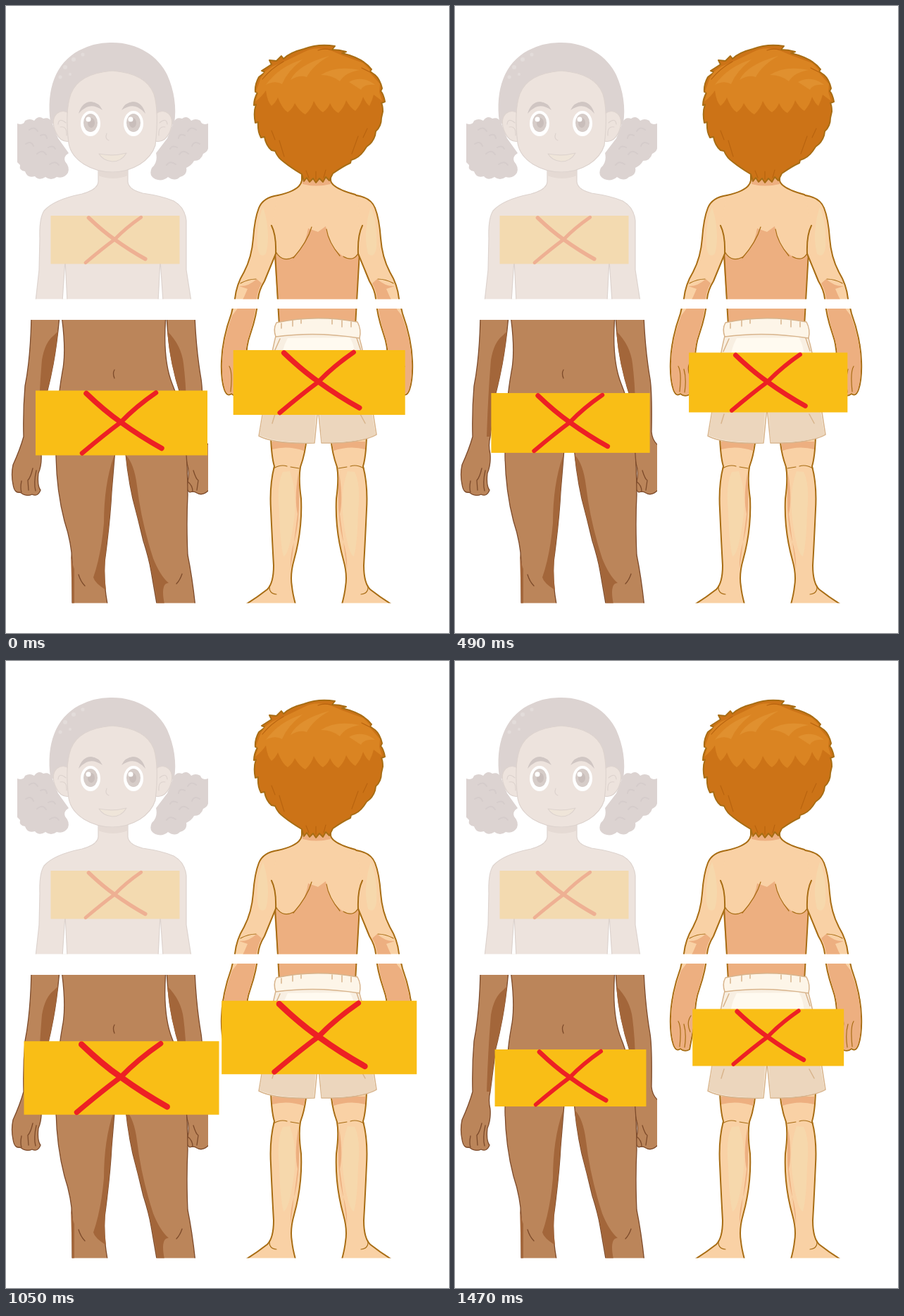
These frames come from a looping animation (629 px wide and 891 px high, 1.54 s). An HTML page:

```html
<!DOCTYPE html>
<html lang="en">
<head>
<meta charset="utf-8">
<title>Body safety chart</title>
<style>
  html, body { margin: 0; width: 100%; height: 100%; overflow: hidden; background: #fff; }
  svg { display: block; width: 629px; height: 891px; }
  path { stroke-linejoin: round; stroke-linecap: round; }
  .line { fill: none; }
  .bare { stroke: none; }
  #faded { fill: #ede3dd; stroke: #ddd3ce; stroke-width: 1.2; }
  #faded .hair { fill: #dcd3d1; stroke: none; }
  #brown { fill: #bb855a; stroke: #7d4b2b; stroke-width: 1.3; }
  #brown .shade { fill: #a3663a; stroke: none; }
  #boy { fill: #f9d1a5; stroke: #a86d14; stroke-width: 2; }
  #boy .shade { fill: #edaf80; stroke: none; }
  #boy .glow { fill: #f6d8ac; stroke: none; }
  #boy .fine { fill: none; stroke-width: 1.2; }
  #boy .cloth { stroke: #d8b48c; stroke-width: 1.5; }
</style>
</head>
<body>
<svg viewBox="0 0 629 891">
  <defs>
    <clipPath id="upper"><rect x="16" y="40" width="271" height="376.500"/></clipPath>
    <clipPath id="lower"><rect x="0" y="446" width="287" height="402.500"/></clipPath>
    <clipPath id="whole"><path d="M300 40H600V416.500H300ZM300 430H600V848.500H300Z"/></clipPath>
    <g id="cross" fill="none">
      <path stroke-width="7.500" d="M-50-42Q-24-17-1-1Q28 20 57 36"/>
      <path stroke-width="6.500" d="M49-43Q20-23-1-1Q-24 16-56 43"/>
    </g>
    <g id="bar">
      <rect x="-122" y="-46" width="244" height="92" fill="#f9be16"/>
      <use href="#cross" stroke="#ed2024"/>
    </g>
  </defs>

  <g id="faded" clip-path="url(#upper)">
    <path class="hair" d="M16 167Q25 170 27 163Q34 159 40 163Q46 155 53 160Q61 157 65 165L74 188L89 209Q81 214 84 221Q91 229 88 237Q82 246 72 243Q64 249 56 243Q47 249 41 242Q30 245 27 235Q18 234 20 226L16 222Z"/>
    <path class="hair" d="M287 167Q278 170 276 163Q269 159 263 163Q257 155 250 160Q242 157 238 165L229 188L213 209Q216 222 207 230Q202 241 212 246Q222 250 230 243Q240 250 247 243Q258 240 256 230Q264 226 267 220Q277 220 280 210Q289 206 287 196Z"/>
    <path id="curls" class="line" stroke="#d5cccb" stroke-width="2" d="M33 176q7-6 12 2M28 196q8-5 11 3M44 210q8-7 13 1M49 184q8-4 9 4M62 225q8-6 13 1M60 201q7-4 10 2"/>
    <use href="#curls" transform="matrix(-1 0 0 1 303 0)"/>
    <path d="M131 225V250Q130 261 108 267Q68 275 54 291Q47 302 48 330L47 375L42 420H263L256 375L256 305Q254 286 238 277Q222 270 194 266Q174 261 173 250V225Z"/>
    <g id="armpit">
      <path fill="#fff" d="M84 360L87 420H80Z"/>
      <path class="line" d="M82 308Q81 340 84 360"/>
    </g>
    <use href="#armpit" transform="matrix(-1 0 0 1 303 0)"/>
    <path class="bare" fill="#e5dad4" d="M132 233Q152 240 172 233L173 241Q152 249 131 241Z"/>
    <path class="hair" d="M63 165C57 119 70 81 104 63Q127 51 151 52C187 52 216 71 229 98Q244 132 239 167L214 183H89Z"/>
    <g id="ear">
      <path d="M90 153Q81 146 72 153Q63 162 71 180Q78 195 91 192Z"/>
      <path class="line" d="M85 166q-10-8-11 2M77 172q10-2 9 12"/>
    </g>
    <use href="#ear" transform="matrix(-1 0 0 1 303 0)"/>
    <path d="M89 195C86 170 86 142 92 125Q103 96 151 92Q199 96 210 125C216 145 215 172 212 198Q207 214 190 225Q172 236 151 236Q129 236 111 225Q92 213 89 195Z"/>
    <g id="eye">
      <path class="bare" fill="#d0c6c3" d="M103 153Q108 136 121 136Q132 137 137 148Q124 139 114 144Q108 147 103 153Z"/>
      <ellipse cx="120" cy="167" rx="14" ry="18" fill="#fff" stroke="none"/>
      <ellipse cx="120" cy="166" rx="10" ry="13" fill="#d6ccc8" stroke="none"/>
      <ellipse cx="121" cy="166" rx="5" ry="7" fill="#c9bebb" stroke="none"/>
    </g>
    <use href="#eye" transform="matrix(-1 0 0 1 301 0)"/>
    <g fill="#fff" stroke="none"><circle cx="117" cy="161" r="3.500"/><circle cx="177" cy="161" r="3.500"/></g>
    <path class="line" d="M143 181q-3 8 3 10"/>
    <path d="M132 210Q152 214 171 209Q164 221 151 221Q138 220 132 210Z" fill="#efe5d9"/>
    <g fill="#e3dcda" stroke="none">
      <circle cx="96" cy="76" r="3"/><circle cx="84" cy="87" r="3"/><circle cx="109" cy="69" r="2.500"/><circle cx="77" cy="101" r="2.500"/><circle cx="91" cy="97" r="2"/>
    </g>
    <rect x="63.500" y="298" width="183" height="68.500" fill="#f3dab0" stroke="none"/>
    <use href="#cross" transform="translate(155 332.500) scale(.75)" stroke="#eeb093"/>
  </g>

  <g id="brown" clip-path="url(#lower)">
    <path d="M36 440Q35 500 27 540Q24 575 25 612Q20 630 10 652Q7 666 10 680Q12 693 20 691Q29 698 37 694Q45 698 49 688Q44 681 46 664Q51 652 50 637Q47 624 50 612L58 550Q71 500 76 440Z"/>
    <path class="shade" d="M68 468Q55 478 51 503Q47 550 45 612H50Q54 580 58 550Q69 510 74 462Z"/>
    <path class="line" d="M38 657Q35 670 31 674L32 688M43 660Q39 678 42 689M22 675Q20 685 22 691"/>
    <path d="M228 440Q231 500 247 550L256 612Q252 630 257 650Q261 662 258 676Q255 688 261 691Q267 689 271 692Q279 697 288 688V624Q280 617 279 605Q280 550 277 530Q270 490 268 440Z"/>
    <path class="shade" d="M229 462Q232 508 248 553L256 600Q257 547 252 508Q249 482 229 462Z"/>
    <path class="line" d="M266 660Q270 673 273 674L271 688M258 676Q265 681 265 690"/>
    <path d="M79 440Q86 492 80 520Q71 570 71 640Q72 690 83 732Q93 762 94 790V855H145Q138 820 140 790Q148 730 150 690L155 630V612H168Q171 660 180 700Q188 730 195 760Q203 785 206 803L215 855H269Q265 815 258 780Q256 735 258 695Q258 590 236 537Q222 502 227 440Z"/>
    <path class="shade" d="M153 640Q139 680 139 735Q135 780 124 812Q126 820 142 830Q138 800 143 765Q149 720 153 640ZM170 638Q182 650 186 682Q192 733 209 785Q219 810 231 820Q219 820 225 850H215Q209 810 197 762Q175 690 170 638ZM92 777Q94 793 97 800V850H94Z"/>
    <path class="line" d="M103 808q3 10 9 16M250 807q-3 9-8 14M154 517q-3 5 0 12"/>
  </g>

  <g id="boy" clip-path="url(#whole)">
    <path class="bare" d="M420 238V248Q418 262 386 269Q367 273 360 287Q378 330 382 350L388 455H496L501 350Q510 300 523 287Q515 271 496 267Q463 259 461 248V238Z"/>
    <path class="shade" d="M380 345Q389 364 403 359Q424 347 429 316L443 321L454 313Q459 344 482 358Q496 363 503 344L496 455H388Z"/>
    <path class="fine" d="M381 345Q390 366 408 357M434 314Q428 335 408 358M455 317Q458 336 474 355M479 356Q496 366 503 345"/>
    <path class="shade" d="M421 245H461V253Q440 258 421 253Z"/>
    <path class="line" d="M420 238V248Q418 262 386 269M461 238V248Q463 259 496 268M382 350L388 455M502 350L496 455"/>
    <g id="arm">
      <path d="M386 269Q365 272 359 287Q353 302 351 330Q349 357 338 378Q327 396 325 416L320 437Q307 473 306 505Q305 530 310 545Q314 556 320 551Q326 556 333 552L341 510Q340 485 347 466Q356 440 358 416Q359 404 367 391L383 352Q384 326 377 312"/>
      <path class="glow" d="M365 285Q355 310 357 343Q360 360 369 352Q375 330 369 300Z"/>
      <path class="shade" d="M331 398Q344 399 356 388L363 394Q357 405 356 416Q354 440 346 466Q339 485 340 508L332 551Q326 554 320 550Q313 553 311 545Q306 530 307 505Q308 475 321 440Q334 425 343 402Z"/>
      <path class="fine" d="M333 394Q344 388 355 388M317 512Q322 520 319 548M325 516Q329 530 326 549M335 504Q328 514 334 527"/>
    </g>
    <use href="#arm" transform="matrix(-1 0 0 1 883 0)"/>

    <g id="leg">
      <path d="M376 612Q377 641 381 654Q374 681 376 715Q378 760 380 795Q380 820 371 829Q357 840 341 850H411Q407 835 406 825Q403 808 409 787Q421 744 419 700Q415 672 418 655Q425 636 427 612Z"/>
      <path class="shade" d="M378 619H425L423 632Q400 624 378 630ZM415 664Q409 700 414 722L404 800Q403 780 410 758Q419 722 415 664Z"/>
      <path class="glow" d="M393 662Q384 680 388 718Q389 763 394 782Q402 780 409 730Q414 690 403 661Z"/>
      <path class="fine" d="M380 657Q390 651 399 654M404 655L416 657M374 824Q373 835 384 836"/>
    </g>
    <use href="#leg" transform="matrix(-1 0 0 1 888 0)"/>

    <g class="cloth">
      <path fill="#f8efe2" d="M384 465Q375 500 370 545L359 611Q382 623 438 621L443 570L448 621Q503 622 526 609L516 545Q510 500 500 465Z"/>
      <path class="bare" fill="#ecd6bd" d="M366 570L360 610Q382 621 437 620L441 570ZM445 570L448 620Q503 621 525 609L518 570Z"/>
      <path class="bare" fill="#fffaf0" d="M400 472Q390 490 391 510H496Q497 485 488 471Z"/>
      <path class="line" d="M382 580l-4 13M503 580l7 13M389 473l-8 18M498 472l6 18"/>
      <path fill="#fdf5e8" d="M384 450Q440 438 499 449Q505 460 502 472Q440 462 383 470Q379 459 384 450Z"/>
      <path class="line" d="M391 451v7M407 447v8M419 446v5M463 446v6M477 447v9M490 449v7"/>
    </g>

    <path fill="#cc7317" d="M359 101Q353 112 354 122L357 123Q352 132 352 141L355 140Q351 151 354 166L358 165Q357 178 362 187L367 186Q369 198 377 205L382 206Q386 216 395 222Q405 230 420 239L423 249L427 244L431 250L436 245L440 251L445 245L450 250L454 243L459 248L464 238Q478 228 489 223L490 219Q501 216 508 206L512 200Q521 194 524 184L525 178Q533 171 533 159L535 150Q535 142 533 138L538 136Q536 125 532 121L534 117Q531 104 524 98L517 93L519 90Q507 74 477 67L483 65Q473 62 463 62L467 57Q444 53 423 61Q403 66 394 75L391 71L384 78L374 77L377 83L363 92L368 94Z"/>
    <path class="bare" fill="#da8422" d="M362 102L355 121L358 124L354 136Q364 128 369 120Q371 136 377 142Q383 137 386 130Q392 146 400 151Q407 146 410 138Q417 150 425 154Q434 146 437 135Q443 147 450 151Q458 145 460 138Q465 149 472 152Q480 144 483 134Q489 145 496 149Q504 140 507 129Q511 138 516 142Q520 134 522 126L534 135L530 122L531 111L517 95L516 90L507 81L477 70L463 64Q440 56 424 65L395 79L378 86L368 93Z"/>
    <path class="bare" fill="#e0902f" d="M369 112Q388 86 421 76Q399 93 392 111Q382 105 369 112ZM404 105Q415 83 459 71Q436 84 427 101Q417 97 404 105ZM447 98Q468 84 502 91Q482 94 474 107Q463 98 447 98ZM487 108Q506 98 524 112Q509 110 504 119Z"/>
    <path class="line" stroke="#b9640f" stroke-width="1.200" d="M364 104Q376 89 394 79M461 62Q450 60 443 63M517 94L505 88M388 191L395 214M377 177L382 190M500 185L491 210M513 174L507 187M426 234L430 244M440 235V246M454 233L451 244"/>
  </g>

  <use class="pulse" href="#bar" data-x="164" data-y="592.500"/>
  <use class="pulse" href="#bar" data-x="444.700" data-y="535"/>
</svg>
<script>
  const STEP = 70, LOOP = 1540, BEAT = 13, RISE = 5;
  const bars = document.querySelectorAll('.pulse');

  // Bars grow quickly, then shrink more slowly.
  function barWidth(time) {
    const beat = (Math.floor(time % LOOP / STEP) + 3) % BEAT;
    return beat <= RISE ? 194.5 + 16.5 * beat : 277 - 10.35 * (beat - RISE);
  }

  function draw() {
    const scale = barWidth(performance.now()) / 244;
    for (const bar of bars)
      bar.setAttribute('transform', `translate(${bar.dataset.x} ${bar.dataset.y}) scale(${scale})`);
    requestAnimationFrame(draw);
  }
  draw();
</script>
</body>
</html>
```
